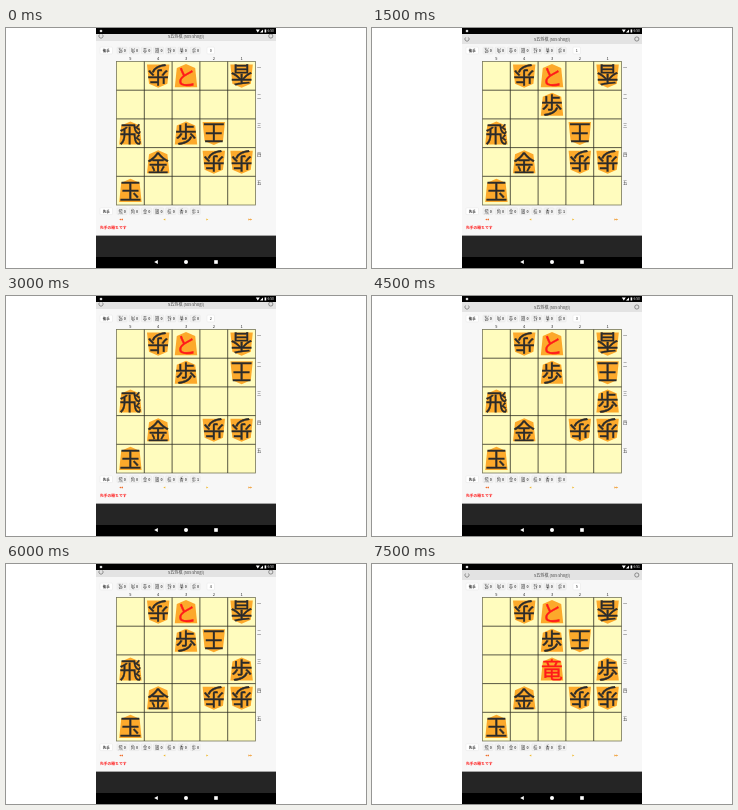
Animation of 360 by 240 pixels, one loop 9000 ms. Source, as an HTML page:

```html
<!DOCTYPE html>
<html lang="ja">
<head>
<meta charset="utf-8">
<title>5五将棋</title>
<style>
  html, body { margin: 0; width: 100%; height: 100%; overflow: hidden; background: #fff; }
  svg { display: block; width: 100vw; height: 100vh; }
  text { font-family: "Noto Sans CJK JP", "Noto Sans CJK", sans-serif; text-anchor: middle; }
  .strong { font-weight: bold; }
  .piece text { font-weight: 500; stroke-width: .35; }
</style>
</head>
<body>
<svg id="stage" viewBox="0 0 360 240"></svg>
<script>
const STEP = 1500;
const BOARD = { x: 110.5, y: 33.5, w: 27.8, h: 28.7 };
const HAND = [...'飛角金銀桂香歩'];
const INK = '#2b2b2b', RED = '#ff1a1a';

// Pieces are [kanji, column, row, side]; side -1 faces down.
const FIXED = [
  ['歩', 1, 0, -1], ['と', 2, 0, 1], ['香', 4, 0, -1],
  ['金', 1, 3, 1], ['歩', 3, 3, -1], ['歩', 4, 3, -1], ['玉', 0, 4, 1],
];

const stage = document.getElementById('stage');

const rect = (x, y, w, h, fill, extra = '') =>
  `<rect x="${x}" y="${y}" width="${w}" height="${h}" fill="${fill}" ${extra}/>`;
const path = (d, fill, extra = '') => `<path d="${d}" fill="${fill}" ${extra}/>`;
const circle = (x, y, r, fill, extra = '') =>
  `<circle cx="${x}" cy="${y}" r="${r}" fill="${fill}" ${extra}/>`;
// Text centred on a point, optionally turned upside down.
const label = (s, x, y, size, fill = INK, side = 1, extra = '') =>
  `<text font-size="${size}" fill="${fill}" transform="translate(${x} ${y}) scale(${side})" y="${size * 0.38}" ${extra}>${s}</text>`;
const strong = (s, x, y, size, fill = INK) => label(s, x, y, size, fill, 1, 'class="strong"');
const button = (x, y, w, fill) =>
  rect(x, y - 3.4, w, 6.8, fill, 'rx=".8" stroke="#e4e4e4" stroke-width=".5"');

function piece([kanji, col, row, side]) {
  const x = BOARD.x + (col + 0.5) * BOARD.w;
  const y = BOARD.y + (row + 0.5) * BOARD.h;
  const color = 'と竜'.includes(kanji) ? RED : INK;
  const body = path('M0-11.8L9.2-7.8L11.2 11.3H-11.2L-9.2-7.8Z', '#fca92b');
  return `<g class="piece" transform="translate(${x} ${y}) scale(${side})">${body}${
    label(kanji, 0, 0.4, 21.8, color, 1, `stroke="${color}"`)}</g>`;
}

function board() {
  const { x, y, w, h } = BOARD;
  let lines = '', names = '';
  for (let i = 1; i < 5; i++)
    lines += `M${x + i * w} ${y}v${5 * h}M${x} ${y + i * h}h${5 * w}`;
  for (let i = 0; i < 5; i++) {
    names += label(5 - i, x + (i + 0.5) * w, 30.8, 4);
    names += label('一二三四五'[i], 253.2, y + i * h + 6.3, 4.2);
  }
  return rect(x, y, 5 * w, 5 * h, '#fffcbe', 'stroke="#77775a" stroke-width=".8"')
    + path(lines, 'none', 'stroke="#2e2e24" stroke-width=".8"') + names;
}

function hand(name, y, side, pawns) {
  let out = button(94, y, 12.5, '#fff') + strong(name, 100.2, y, 3.5);
  HAND.forEach((kanji, i) => {
    const x = 111 + i * 12.2;
    out += button(x, y, 10, '#f2f2f2') + label(kanji, x + 3.6, y, 4.2, '#444', side);
    out += strong(kanji === '歩' ? pawns : 0, x + 7.9, y, 3.6, '#444');
  });
  return out;
}

function header(y) {
  const pen = 'stroke="#555" stroke-width=".6"';
  return rect(90, y - 5, 180, 10, '#e3e3e3')
    + label('5五将棋 (5x5 shogi)', 180, y, 4.1, '#444')
    + path(`M93.6 ${y - 1.5}A2.1 2.1 0 1 0 96.4 ${y - 1.5}`, 'none', pen)
    + circle(264.8, y, 2.1, 'none', pen);
}

function systemBars(time) {
  return rect(90, 0, 180, 6, '#000') + circle(95, 3, 1.3, '#ddd')
    + path('M249.8 1.6h4L251.8 4.5Z', '#fff') + path('M257 1.5v3h-3Z', '#fff')
    + rect(258.6, 1.4, 1.6, 3.1, '#fff') + label(time, 264.7, 3, 3.4, '#fff')
    + rect(90, 207.6, 180, 22, '#252525') + rect(90, 229, 180, 11, '#000')
    + path('M148.2 234l3.6-2.1v4.2Z', '#fff') + circle(180, 234, 2, '#fff')
    + rect(208.2, 232.2, 3.6, 3.6, '#fff');
}

function controls() {
  const arrow = (x, dir, color) => path(`M${x - dir} 190.5l${2 * dir} 1l${-2 * dir} 1Z`, color);
  return arrow(114.2, -1, '#f0702d') + arrow(116, -1, '#f0702d')
    + arrow(158.3, -1, '#f0b92d') + arrow(201.3, 1, '#f0b92d')
    + arrow(243.4, 1, '#f09a2d') + arrow(245.2, 1, '#f09a2d');
}

function scene(move) {
  const king = move < 2 ? [3, 2] : move < 4 ? [4, 1] : [3, 1];
  const pieces = [
    ...FIXED,
    ['歩', 2, move < 1 ? 2 : 1, 1],
    ['王', ...king, -1],
    move < 5 ? ['飛', 0, 2, 1] : ['竜', 2, 2, 1],
  ];
  if (move >= 3) pieces.push(['歩', 4, 2, 1]);

  return rect(90, 0, 180, 240, '#f7f7f7')
    + header(move % 2 ? 11 : 8)
    + hand('後手', 22.5, -1, 0)
    + button(201, 22.5, 7.5, '#fff') + label(move, 204.8, 22.5, 3.8)
    + board() + pieces.map(piece).join('')
    + hand('先手', 183.2, 1, move < 3 ? 1 : 0)
    + controls()
    + strong('先手の勝ちです', 107.2, 199.7, 3.8, RED)
    + systemBars(move < 5 ? '6:50' : '6:51');
}

const start = performance.now();
let shown = -1;
function tick() {
  const move = Math.floor((performance.now() - start) / STEP) % 6;
  if (move !== shown) stage.innerHTML = scene(shown = move);
  requestAnimationFrame(tick);
}
tick();
</script>
</body>
</html>
```
